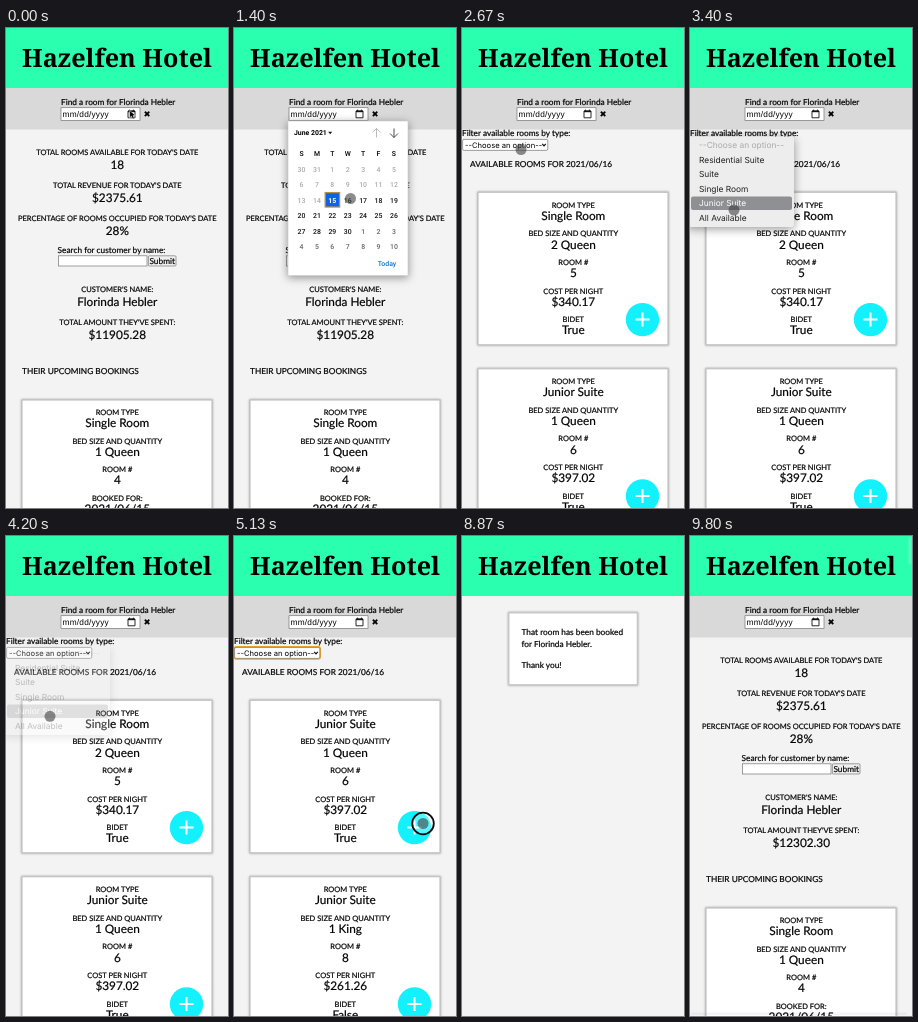
These frames come from a looping animation (222 px wide and 480 px high, 9.87 s). An HTML page:

```html
<!DOCTYPE html>
<html lang="en">
<head>
<meta charset="utf-8">
<title>Hotel booking demo</title>
<style>
  html, body { margin: 0; width: 100%; height: 100%; overflow: hidden; background: #f3f3f3; }
  svg { display: block; width: 222px; height: 480px; }
  text { font-family: Lato, sans-serif; fill: #000; text-rendering: geometricPrecision; }
  .title { font: 700 25.2px "Noto Serif", serif; }
  .label { font-size: 7.5px; }
  .value { font-size: 11.8px; }
  .body { font-size: 8.3px; }
  .label, .value, .body { stroke: #000; stroke-width: .2px; }
  .ui { font-family: Inter, sans-serif; font-size: 7.6px; }
  .date { font-family: "Liberation Sans", Arial, sans-serif; font-size: 8.3px; letter-spacing: .2px; }
  .menu { font-family: Inter, sans-serif; font-size: 8.4px; }
  .cal { font-family: Roboto, sans-serif; font-size: 6.9px; }
  .mid { text-anchor: middle; }
  .card { fill: #fff; stroke: #c6c6c6; stroke-width: 1.3; filter: drop-shadow(0 0 1.2px #999); }
  .field { fill: #fff; stroke: #767676; stroke-width: .7; }
</style>
</head>
<body>
<svg id="stage" viewBox="0 0 222 480" xmlns="http://www.w3.org/2000/svg"></svg>
<script>
const LOOP = 9870, STEP = 200 / 3;
const HOTEL = "Hazelfen Hotel", GUEST = "Florinda Hebler";
const NS = "http://www.w3.org/2000/svg";
const stage = document.getElementById("stage");

function add(parent, tag, attrs = {}, content) {
  const el = document.createElementNS(NS, tag);
  for (const k in attrs) el.setAttribute(k, attrs[k]);
  if (content !== undefined) el.textContent = content;
  return parent.appendChild(el);
}
const group = (parent = stage) => add(parent, "g");
const rect = (p, x, y, width, height, attrs) => add(p, "rect", { x, y, width, height, ...attrs });
const text = (p, x, y, str, cls, attrs) => add(p, "text", { x, y, class: cls, ...attrs }, str);
const line = (p, d, stroke, width = 1) =>
  add(p, "path", { d, stroke, "stroke-width": width, fill: "none" });

function pair(p, y, label, value, gap = 12.2) {
  text(p, 111.3, y, label, "label mid");
  return text(p, 111.3, y + gap, value, "value mid");
}

function details(p, y, rows) {
  rows.forEach(([label, value], i) => pair(p, y + i * 28.6, label, value));
}

function header() {
  const g = group();
  rect(g, 0, 0, 222, 60, { fill: "#2affaf" });
  text(g, 111, 39, HOTEL, "title mid");
}

function searchBar() {
  const g = group();
  rect(g, 0, 60, 222, 41.5, { fill: "#d9d9d9" });
  text(g, 55, 76.8, `Find a room for ${GUEST}`, "body");
  rect(g, 55, 79.7, 79, 12.8, { class: "field" });
  text(g, 56.6, 89, "mm/dd/yyyy", "date");
  line(g, "M122 83h7v6.8h-7z M123.6 81.6v1.6 M127.4 81.6v1.6", "#111", .9);
  rect(g, 122, 82.6, 7, 1.6, { fill: "#111" });
  text(g, 141, 89.3, "✖", "mid", { style: "font: 8.5px 'DejaVu Sans', sans-serif" });
  return g;
}

function dashboard() {
  const g = group();
  pair(g, 126.7, "TOTAL ROOMS AVAILABLE FOR TODAY'S DATE", "18", 14.2);
  pair(g, 159.8, "TOTAL REVENUE FOR TODAY'S DATE", "$2375.61", 14.2);
  pair(g, 193.2, "PERCENTAGE OF ROOMS OCCUPIED FOR TODAY'S DATE", "28%", 14.2);
  text(g, 51.6, 225.4, "Search for customer by name:", "body");
  rect(g, 52.4, 227.8, 88.6, 10.2, { class: "field" });
  rect(g, 142.4, 227.8, 27.6, 10.2, { class: "field", rx: 1, style: "fill:#efefef" });
  text(g, 156.2, 235.8, "Submit", "body mid");
  pair(g, 263.7, "CUSTOMER'S NAME:", GUEST, 14.2);
  const spent = pair(g, 297.2, "TOTAL AMOUNT THEY'VE SPENT:", "", 14.2);
  text(g, 16, 346, "THEIR UPCOMING BOOKINGS", "body");
  rect(g, 16, 372, 190, 160, { class: "card" });
  details(g, 387, [["ROOM TYPE", "Single Room"], ["BED SIZE AND QUANTITY", "1 Queen"],
    ["ROOM #", "4"], ["BOOKED FOR:", "2021/06/15"]]);
  return { g, spent };
}

function roomCard(p, y, [type, beds, number, cost, bidet]) {
  rect(p, 16, y, 190, 152.5, { class: "card" });
  details(p, y + 15.4, [["ROOM TYPE", type], ["BED SIZE AND QUANTITY", beds],
    ["ROOM #", number], ["COST PER NIGHT", cost], ["BIDET", bidet]]);
  add(p, "circle", { cx: 180.5, cy: y + 127.3, r: 16.7, fill: "#13f1ff" });
  line(p, `M173.5 ${y + 127.3}h14 M180.5 ${y + 120.3}v14`, "#fff", 2);
}

function roomList(rooms) {
  const g = group();
  rooms.forEach((room, i) => roomCard(g, 164.3 + i * 176.4, room));
  return g;
}

function filterBar() {
  const g = group();
  text(g, 0, 108.4, "Filter available rooms by type:", "body");
  const ring = rect(g, .6, 111, 85.4, 11.8,
    { rx: 2, fill: "none", stroke: "#eda52c", "stroke-width": 2 });
  rect(g, .6, 111.4, 85.2, 11, { class: "field", rx: 1.5 });
  text(g, 3, 119.7, "--Choose an option--", "ui");
  line(g, "M80.2 115.8l1.8 2l1.8 -2", "#111", 1.2);
  text(g, 8, 138.6, "AVAILABLE ROOMS FOR 2021/06/16", "body");
  return { g, ring };
}

function confirmation() {
  const g = group();
  rect(g, 46.8, 76.8, 128.6, 72, { class: "card" });
  ["That room has been booked", `for ${GUEST}.`, "Thank you!"].forEach((s, i) =>
    text(g, 59.5, [98.8, 111.3, 132.3][i], s, "body"));
  return g;
}

function calendar() {
  const g = group();
  const col = i => 67.5 + i * 15.4;
  rect(g, 54, 93, 120, 154.6, {
    fill: "#fff", stroke: "#c8c8c8", "stroke-width": .6,
    style: "filter:drop-shadow(0 2px 4px rgba(0,0,0,.4))"
  });
  text(g, 60, 107, "June 2021", "cal", { "font-weight": 700 });
  add(g, "path", { d: "M94.2 103.8h4l-2 2.4z", fill: "#111" });
  line(g, "M142.5 109.5v-9 M138.5 104.5l4 -4l4 4", "#aaa", .8);
  line(g, "M160 100.5v9 M156 105.5l4 4l4 -4", "#222", .8);
  [..."SMTWTFS"].forEach((d, i) => text(g, col(i), 128, d, "cal mid", { "font-weight": 500 }));
  rect(g, 91.2, 164.6, 14.4, 14.4, { fill: "#0c63ea", stroke: "#b98d45", "stroke-width": 1.3 });
  for (let i = 0; i < 42; i++) {
    const n = i - 1;
    const day = n < 1 ? n + 31 : n > 30 ? n - 30 : n;
    const fill = n === 15 ? "#fff" : n < 15 ? "#aaa" : n > 30 ? "#666" : "#111";
    text(g, col(i % 7), 143.9 + Math.floor(i / 7) * 15.4, day, "cal mid",
      { style: `fill:${fill};font-weight:${n === 15 ? 700 : 500}` });
  }
  text(g, 153, 238.4, "Today", "cal mid", { style: "fill:#0878cc;font-weight:500" });
  return g;
}

function typeMenu() {
  const g = group();
  rect(g, -3, 108.5, 107, 90.5, {
    rx: 3, fill: "#ededed", style: "filter:drop-shadow(0 2px 5px rgba(0,0,0,.4))"
  });
  const bar = rect(g, 1, 0, 101, 13.6, { rx: 2, fill: "#8f9094" });
  const items = ["--Choose an option--", "Residential Suite", "Suite", "Single Room",
    "Junior Suite", "All Available"].map((s, i) => text(g, 9, 120.3 + i * 14.45, s, "menu"));
  return { g, bar, items };
}

function scrollbars() {
  const g = group();
  rect(g, 218.5, 1.5, 2.6, 27, { rx: 1.3, fill: "#fff", opacity: .7 });
  rect(g, 1, 476.4, 216, 2.6, { rx: 1.3, fill: "#888", opacity: .3 });
  return g;
}

function pointer() {
  const g = group();
  const ring = add(g, "circle", { r: 10.8, fill: "rgba(255,255,255,.3)", stroke: "#0b0b0b", "stroke-width": 1.8 });
  const dot = add(g, "circle", { r: 5.5, fill: "#404040", opacity: .6 });
  const arrow = add(g, "path", {
    d: "M-2.4 -3.6v7.4l1.9 -1.6l1.2 2.8l1.6 -.7l-1.2 -2.7h2.5z",
    fill: "#000", stroke: "#fff", "stroke-width": .5
  });
  return { g, ring, dot, arrow };
}

const first = roomList([["Single Room", "2 Queen", "5", "$340.17", "True"],
  ["Junior Suite", "1 Queen", "6", "$397.02", "True"]]);
const filtered = roomList([["Junior Suite", "1 Queen", "6", "$397.02", "True"],
  ["Junior Suite", "1 King", "8", "$261.26", "False"]]);
const home = dashboard();
const booked = confirmation();
header();
const bar = searchBar();
const filter = filterBar();
const picker = calendar();
const menu = typeMenu();
const bars = scrollbars();
const cursor = pointer();

const path = [[0, 126, 86], [1030, 126, 86], [1400, 116.5, 170.5], [1530, 116, 174.5],
  [2430, 116, 174.5], [2670, 59, 121.5], [3030, 59, 121.5], [3400, 44, 182],
  [3470, 44, 182], [3530, 44, 180.3], [4620, 44, 180.3], [5070, 189, 287.5],
  [6170, 189, 287.5], [6330, 189, 312]];
const clicks = [[250, 800], [1640, 1870], [2730, 2930], [3690, 3930], [5000, 5860]];

const clamp = v => Math.min(1, Math.max(0, v));
const ramp = (t, a, b) => clamp((t - a) / (b - a));
const ease = v => v * v * (3 - 2 * v);
const pulse = (t, a, b, c, d) => ramp(t, a, b) * (1 - ramp(t, c, d));
const show = (el, on) => { el.style.display = on ? "" : "none"; };
function fade(el, v) {
  show(el, v > 0);
  el.style.opacity = v;
}

function pointAt(t) {
  const i = path.findIndex(p => p[0] > t);
  if (i < 0) return path[path.length - 1].slice(1);
  const [t0, x0, y0] = path[i - 1], [t1, x1, y1] = path[i];
  const k = ease(ramp(t, t0, t1));
  return [x0 + (x1 - x0) * k, y0 + (y1 - y0) * k];
}

// Menu rows run from 0 to 5; the chosen row blinks once when clicked.
function drawMenu(t, y) {
  fade(menu.g, pulse(t, 2860, 2990, 4010, 4270));
  const row = Math.min(5, Math.max(0, Math.round((y - 117.5) / 14.45)));
  const lit = !(t > 3850 && t < 3920);
  show(menu.bar, lit);
  menu.bar.setAttribute("y", 110.6 + row * 14.45);
  menu.items.forEach((el, i) => { el.style.fill = lit && i === row ? "#fff" : i ? "#222" : "#aaa"; });
}

function drawCursor(t, x, y) {
  cursor.g.setAttribute("transform", `translate(${x} ${y})`);
  fade(cursor.g, 1 - ramp(t, 6150, 6330));
  show(cursor.arrow, t < 260);
  show(cursor.dot, t >= 260);
  const press = Math.max(...clicks.map(([a, b]) => pulse(t, a, a + 120, b - 60, b + 140)));
  cursor.ring.setAttribute("transform", `scale(${.55 + .45 * press})`);
  fade(cursor.ring, press);
}

function draw(t) {
  const atHome = t < 1930 || t >= 9395;
  const listing = t >= 1930 && t < 5265;
  show(home.g, atHome);
  home.spent.textContent = t < 5000 ? "$11905.28" : "$12302.30";
  show(first, listing && t < 4320);
  show(filtered, listing && t >= 4320);
  show(filter.g, listing);
  show(filter.ring, t >= 4320);
  show(bar, atHome || listing);
  show(booked, t >= 5265 && t < 9395);
  fade(picker, pulse(t, 430, 600, 1830, 2000));
  fade(bars, .7 * pulse(t, 9380, 9400, 9630, 9930));

  const [x, y] = pointAt(t);
  drawMenu(t, y);
  drawCursor(t, x, y);
}

const start = performance.now();
function tick() {
  const t = (performance.now() - start) % LOOP;
  draw(Math.floor((t + 4) / STEP) * STEP);
  requestAnimationFrame(tick);
}
tick();
</script>
</body>
</html>
```
